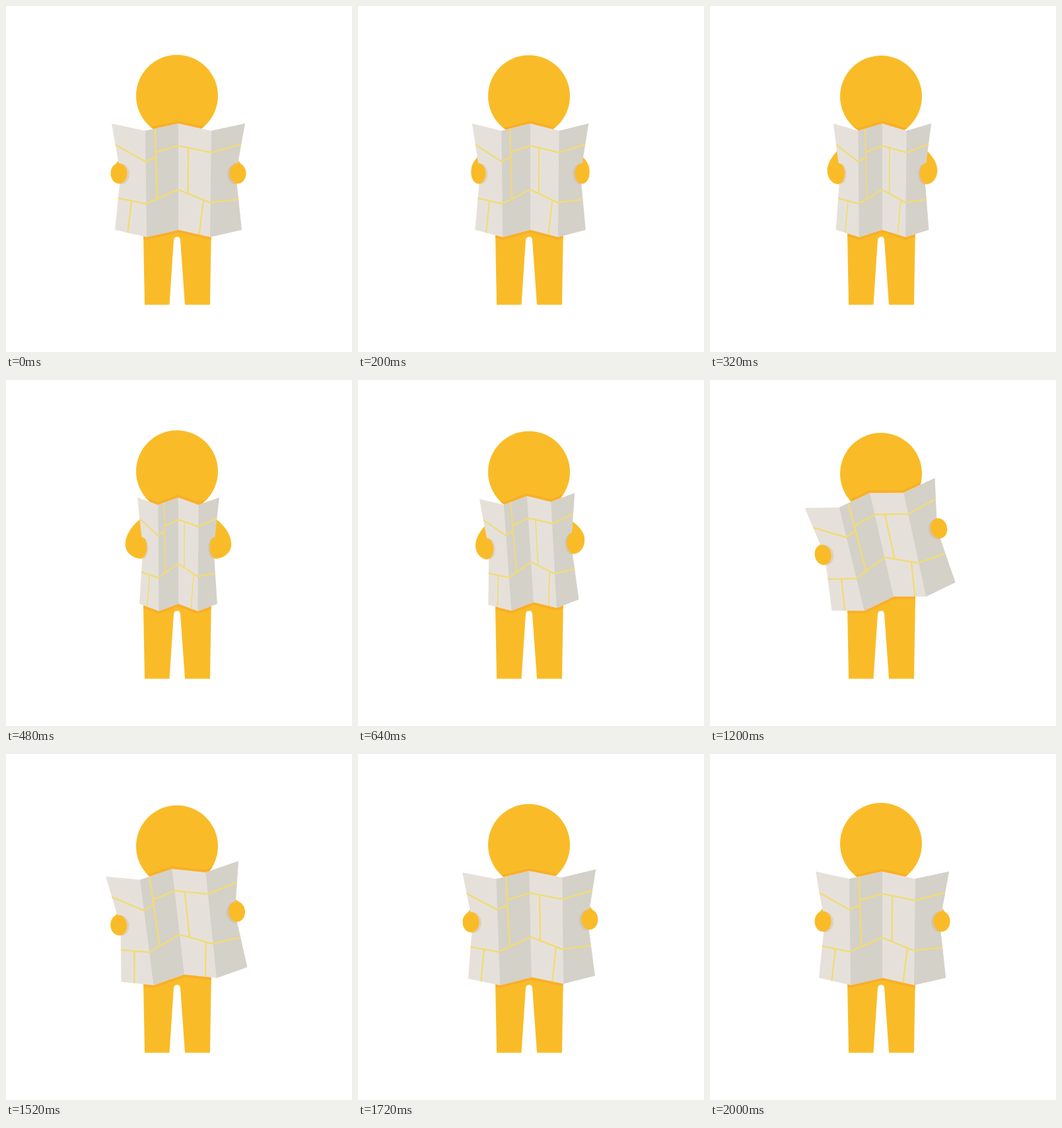
Write an HTML page that moves like this. It is 524x524 px and loops after 2.04 s.

```html
<!DOCTYPE html>
<html lang="en">
<head>
<meta charset="utf-8">
<title>Map reader</title>
<style>
  html, body { margin: 0; width: 100%; height: 100%; overflow: hidden; background: #fff; }
  svg { display: block; width: 100vw; height: 100vh; }
  .skin { fill: #f9bc28; }
  .light { fill: #e5e1da; }
  .dark { fill: #d4d1c9; }
  .roads { fill: none; stroke: #f1db78; stroke-width: 2.5; }
  .shade { fill: none; stroke: #f9af27; stroke-width: 8; vector-effect: non-scaling-stroke; }
  .touch { fill: #d9966e; fill-opacity: .24; }
</style>
</head>
<body>
<svg viewBox="0 0 524 524">
  <defs>
    <path id="body" d="M208 195H311V330L309 452.5H271L264 354Q263.500 349.500 259.250 349.500T254 354L247.500 452.500H210L208 345Z"/>
    <path id="sheet" d="M160 178L211 189L261 178L311 189L362 178L348 255L357 339L309 350L261 339L213 350L165 339L173.500 255Z"/>
    <clipPath id="figure">
      <circle class="head" cx="259" r="62"/>
      <use href="#body"/>
    </clipPath>
    <clipPath id="paper"><use href="#sheet"/></clipPath>
  </defs>

  <path class="skin arm"/>
  <path class="skin arm"/>
  <use class="skin" href="#body"/>
  <circle class="skin head" cx="259" r="62"/>
  <g clip-path="url(#figure)">
    <g class="map"><path class="shade" d="M160 178L211 189L261 178L311 189L362 178L348 255L357 339L309 350L261 339L213 350L165 339L173.500 255Z"/></g>
  </g>

  <g class="map">
    <use class="light" href="#sheet"/>
    <path class="dark" d="M211 189L261 178V339L213 350ZM311 189L362 178L348 255L357 339L309 350Z"/>
    <g clip-path="url(#paper)">
      <path class="roads" d="M162 208L211 235.500L228 228.500M226 221.500L261 211.500L311 222L360 208.500
        M225.500 182L229 291M276 214.500L275.500 284
        M166 290.300L212 299.500L261 278L308 297.500L357 292.500
        M190 296L184 346M299 294L292 350"/>
      <ellipse class="touch" cx="174.500" cy="254.500" rx="12.500" ry="15.500"/>
      <ellipse class="touch" cx="347.500" cy="254.500" rx="12.500" ry="15.500"/>
    </g>
    <ellipse class="skin" cx="171" cy="253.500" rx="12.500" ry="15.500"/>
    <ellipse class="skin" cx="351" cy="253.500" rx="12.500" ry="15.500"/>
  </g>
</svg>
<script>
  const LOOP = 2040, FOLD = 0.392, TILT = 12.93;
  const MID = 260.8, PIVOT = { x: 221, y: 258.5 };
  const heads = document.querySelectorAll('.head');
  const maps = document.querySelectorAll('.map');
  const arms = document.querySelectorAll('.arm');

  // Eased progress from 0 to 1 between two times
  const ease = (t, from, to) => {
    const p = Math.min(1, Math.max(0, (t - from) / (to - from)));
    return (1 - Math.cos(Math.PI * p)) / 2;
  };

  // Where a point of the map lands on the stage
  function place(x, y, scale, tilt) {
    const a = tilt * Math.PI / 180;
    const dx = MID + (x - MID) * scale - PIVOT.x, dy = y - PIVOT.y;
    return {
      x: PIVOT.x + dx * Math.cos(a) + dy * Math.sin(a),
      y: PIVOT.y - dx * Math.sin(a) + dy * Math.cos(a)
    };
  }

  // side is -1 for the left arm, 1 for the right
  function armPath(side, hand, fold) {
    const reach = 8 + 14.8 * fold + 76 * fold * fold;
    const elbow = hand.x + side * reach, y = hand.y;
    const low = y + 15 + 6 * fold;
    return `M${MID + side * 45.8} 203
      C${MID + side * 65.8} 214 ${elbow} ${y - 21.5} ${elbow} ${y - 4.5}
      C${elbow} ${y + 8.5} ${hand.x + side * reach * 0.5} ${low} ${hand.x} ${low}
      L${MID + side * 35} ${y}Z`;
  }

  function draw(t) {
    const open = ease(t, 520, 865);
    const fold = FOLD * (ease(t, 0, 520) - open);
    const scale = 1 - fold;
    const tilt = TILT * (open - ease(t, 1190, 1860));
    const nod = 6 * (ease(t, 0, 1150) - ease(t, 1150, LOOP));

    heads.forEach(h => h.setAttribute('cy', 136 + nod));
    maps.forEach(m => m.setAttribute('transform',
      `rotate(${-tilt} ${PIVOT.x} ${PIVOT.y}) translate(${MID * fold} 0) scale(${scale} 1)`));
    arms[0].setAttribute('d', armPath(-1, place(171, 253.5, scale, tilt), fold));
    arms[1].setAttribute('d', armPath(1, place(351, 253.5, scale, tilt), fold));
  }

  const start = performance.now();
  function tick() {
    draw((performance.now() - start) % LOOP);
    requestAnimationFrame(tick);
  }
  tick();
</script>
</body>
</html>
```
